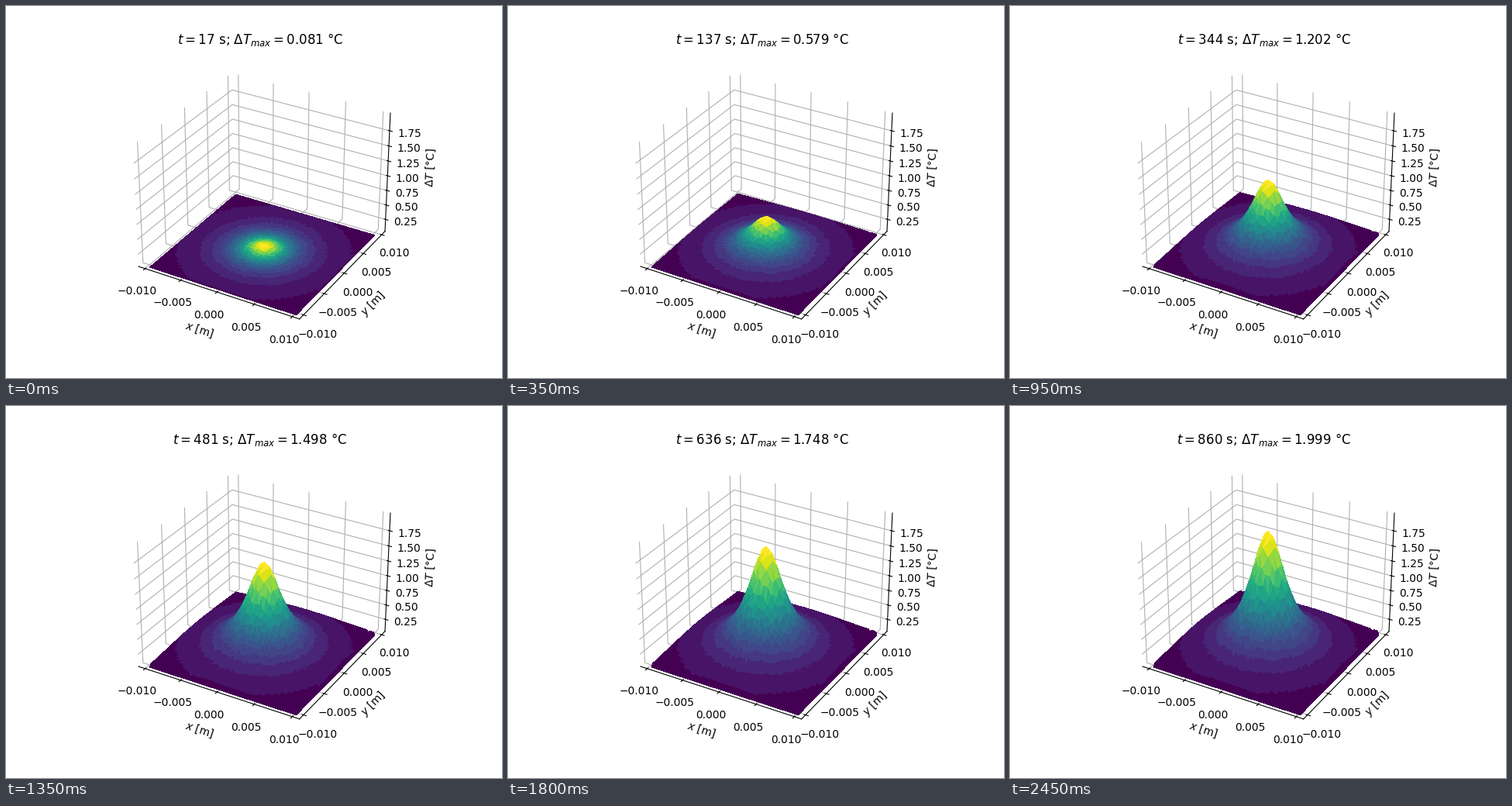
Animation of 640x480 px, one loop 2.5 s. Source, as a matplotlib script:

```python
import numpy as np
import matplotlib.pyplot as plt
from matplotlib.animation import FuncAnimation

FRAMES, INTERVAL = 50, 50
STEP = 17.2                    # simulated seconds per frame
T_FINAL, TAU = 2.457, 511.8    # saturation temperature rise and time constant
HALF, CORE = 0.01, 0.0027      # half width of the plate, width of the hot spot
N = 41


def peak(t):
    return T_FINAL * (1 - np.exp(-t / TAU))


def build_mesh():
    """Jittered interior points plus a cold rim around the plate."""
    rng = np.random.default_rng(4)
    g = np.linspace(-0.99 * HALF, 0.99 * HALF, N)
    x, y = np.meshgrid(g, g)
    for c in (x, y):
        c[1:-1, 1:-1] += rng.uniform(-0.3, 0.3, (N - 2, N - 2)) * (g[1] - g[0])
    x[N // 2, N // 2] = y[N // 2, N // 2] = 0
    shape = 1 / (1 + (x**2 + y**2) / CORE**2)

    side = np.linspace(-HALF, HALF, N)
    end = np.full(N - 2, HALF)
    rim_x = np.concatenate([side, side, -end, end])
    rim_y = np.concatenate([np.full(N, -HALF), np.full(N, HALF),
                            side[1:-1], side[1:-1]])
    return (np.append(x.ravel(), rim_x), np.append(y.ravel(), rim_y),
            np.append(shape.ravel(), np.zeros(rim_x.size)))


def padded(lo, hi):
    pad = (hi - lo) / 48
    return lo - pad, hi + pad


px, py, shape = build_mesh()
cmap = plt.get_cmap("viridis", 20)

fig = plt.figure(figsize=(6.4, 4.8), dpi=100)
ax = fig.add_subplot(projection="3d")
ax.set_xlim(*padded(-1.05 * HALF, 1.05 * HALF))
ax.set_ylim(*padded(-1.05 * HALF, 1.05 * HALF))
ax.set_zlim(*padded(peak(STEP), peak(STEP * FRAMES)))
ax.set_zticks(np.arange(0.25, 1.8, 0.25))
ax.set_xlabel("$x$ [m]")
ax.set_ylabel("$y$ [m]")
ax.set_zlabel(r"$\Delta T$ [°C]")
for axis in (ax.xaxis, ax.yaxis, ax.zaxis):
    axis.set_pane_color((1, 1, 1, 1))

surface = None


def draw(i):
    global surface
    if surface is not None:
        surface.remove()
    t = STEP * (i + 1)
    top = peak(t)
    surface = ax.plot_trisurf(px, py, top * shape, cmap=cmap,
                              linewidth=0, antialiased=False)
    ax.set_title(rf"$t={int(t + 1e-6)}$ s; $\Delta T_{{max}}={top:.3f}$ °C")
    return ()


anim = FuncAnimation(fig, draw, frames=FRAMES, interval=INTERVAL,
                     init_func=lambda: draw(0), repeat=True, repeat_delay=0)
plt.show()
```
